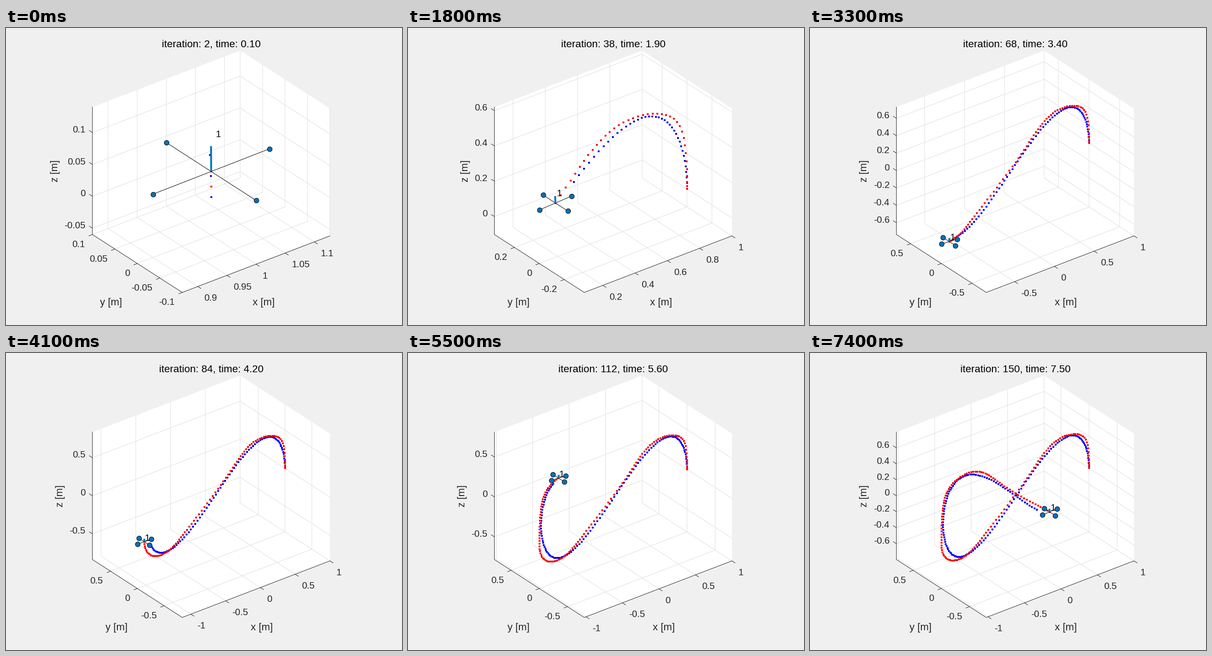
Write a matplotlib script that moves like this. It is 864 px wide and 648 px high and loops after 7500 ms.

```python
import numpy as np
import matplotlib.pyplot as plt
from matplotlib.animation import FuncAnimation

W, H, FRAMES, INTERVAL = 864, 648, 75, 100
DT, OMEGA = 0.05, 2 / 3
ARM, THRUST, LABEL_GAP = 0.1, 0.04, 0.1 / 3
ASPECT = 1.268                       # x side of the box relative to y and z
INK, BLUE, GREY = "#262626", "#0072BD", "#DFDFDF"
FONT, TICK_SIZE, LABEL_SIZE, TITLE_SIZE = "Liberation Sans", 20.4, 22.2, 22.4
MAX_TICKS = (6, 6, 7)

# screen directions of the box edges
FRONT = np.array([384.0, 576.5])
EDGES = np.array([[322.3, -123.4], [-196.0, -126.4], [0.0, -278.0]])


def bump(t, mid, width):
    return np.exp(-((t - mid) / width) ** 2)


def sway(a):
    """Steady sideways tracking error, mirrored every half turn."""
    return (0.024 * np.cos(a) - 0.156 * np.sin(a)
            + 0.006 * np.cos(5 * a) - 0.021 * np.cos(7 * a + 0.4))


def lift(a):
    """Steady height error, repeated every half turn."""
    return (0.1 * np.cos(2 * a) + 0.013 * np.sin(2 * a)
            + 0.006 * np.sin(4 * a) + 0.009 * np.cos(6 * a) - 0.002)


def points(x, z):
    return np.column_stack([x, np.zeros_like(x), z])


TIME = np.arange(2 * FRAMES + 1) * DT
THETA = OMEGA * TIME
PLAN = points(np.cos(THETA), 0.5 * np.sin(2 * THETA))

# the drone starts at rest, so both errors need a moment to settle
ERR_X = sway(THETA) + 0.02 * bump(TIME, 0.5, 0.3)
ERR_Z = lift(THETA) - (lift(0) + 0.43 * TIME) * bump(TIME, 0, 0.31)
FLOWN = points(np.clip(PLAN[:, 0] + ERR_X, -1.024, 1), PLAN[:, 2] + ERR_Z)
TILT = 0.045 * np.cos(THETA) - 0.04 * np.cos(3 * THETA)


def fit_limits(data):
    """Tight limits, widened around their middle to keep equal scales."""
    lo, hi = data.min(axis=0), data.max(axis=0)
    shape = np.array([ASPECT, 1, 1])
    half = shape * np.max((hi - lo) / shape) / 2
    mid = (lo + hi) / 2
    return mid - half, mid + half


def nice_ticks(lo, hi, most):
    for step in (0.01, 0.02, 0.05, 0.1, 0.2, 0.5, 1):
        first = np.ceil(lo / step - 1e-6)
        last = np.floor(hi / step + 1e-6)
        if last - first < most:
            return np.arange(first, last + 1) * step
    return np.array([])


def tick_text(v):
    return f"{round(v, 4) + 0:g}"


def text_width(s):
    return TICK_SIZE * sum({".": 0.278, "-": 0.333}.get(c, 0.556) for c in s)


fig = plt.figure(figsize=(W / 72, H / 72), dpi=72, facecolor="#F0F0F0")
ax = fig.add_axes([0, 0, 1, 1])


def line(pts, color, width=1, **kw):
    pts = np.asarray(pts)
    ax.plot(pts[:, 0], pts[:, 1], color=color, lw=width, **kw)


def dots(pts, color, z):
    ax.plot(pts[:, 0], pts[:, 1], ls="none", marker="s", ms=4, mew=0,
            color=color, zorder=z)


def write(x, y, s, size=TICK_SIZE, color=INK, ha="center", z=3):
    """Place text with its digits centred on y."""
    ax.text(x, y + 0.358 * size, s, fontname=FONT, fontsize=size, color=color,
            ha=ha, va="baseline", zorder=z)


def box(u, v, w):
    return FRONT + np.array([u, v, w]) @ EDGES


def draw_axes(lo, hi):
    hull = [box(0, 0, 0), box(1, 0, 0), box(1, 0, 1), box(1, 1, 1),
            box(0, 1, 1), box(0, 1, 0)]
    ax.fill(*np.array(hull).T, color="white", lw=0, zorder=0)

    ticks = [nice_ticks(lo[i], hi[i], MAX_TICKS[i]) for i in range(3)]
    frac = [(ticks[i] - lo[i]) / (hi[i] - lo[i]) for i in range(3)]
    grid = ([[(u, 0, 0), (u, 1, 0), (u, 1, 1)] for u in frac[0]]
            + [[(0, v, 0), (1, v, 0), (1, v, 1)] for v in frac[1]]
            + [[(0, 1, w), (1, 1, w), (1, 0, w)] for w in frac[2]])
    for path in grid:
        line([box(*p) for p in path], GREY, zorder=1)

    line([box(1, 0, 0), box(0, 0, 0), box(0, 1, 0), box(0, 1, 1)], INK, zorder=2)

    # tick start, tick mark, label offset, label alignment
    styles = [
        (lambda f: box(f, 0, 0), (6.8, 4.4), (14, 24), "left"),
        (lambda f: box(0, f, 0), (-7.6, 2.9), (-16, 20), "right"),
        (lambda f: box(0, 1, f), (-6.8, -4.4), (-15, -7.5), "right"),
    ]
    widest = []
    for (place, mark, gap, ha), vals, fr in zip(styles, ticks, frac):
        names = [tick_text(v) for v in vals]
        widest.append(max(map(text_width, names)))
        for name, f in zip(names, fr):
            p = place(f)
            line([p, p + mark], INK, zorder=2)
            write(*(p + gap), name, ha=ha)

    write(525.5 + 0.92 * widest[0], 597, "x [m]", LABEL_SIZE)
    write(278.5 - 1.07 * widest[1], 597, "y [m]", LABEL_SIZE)
    ax.text(152 - 0.96 * widest[2], 311, "z [m]", fontname=FONT, rotation=90,
            fontsize=LABEL_SIZE, color=INK, ha="center", va="center")


def update(k):
    ax.clear()
    ax.set_xlim(-0.5, W - 0.5)
    ax.set_ylim(H - 0.5, -0.5)
    ax.axis("off")

    n = 2 * (k + 1)
    plan, flown = PLAN[:n + 1], FLOWN[:n + 1]
    pos, tilt = flown[-1], TILT[n]
    fore = np.array([np.cos(tilt), 0, np.sin(tilt)]) * ARM
    side = np.array([0, ARM, 0])
    up = np.array([-np.sin(tilt), 0, np.cos(tilt)]) * THRUST
    motors = np.array([pos - fore, pos + fore, pos - side, pos + side])
    top = pos + up

    lo, hi = fit_limits(np.vstack([plan, flown, motors, [top]]))

    def project(p):
        return FRONT + (np.asarray(p) - lo) / (hi - lo) @ EDGES

    draw_axes(lo, hi)
    dots(project(plan), "blue", 6 if k == 0 else 4)
    dots(project(flown), "red", 5)

    ends = project(motors)
    line(ends[:2], "black", zorder=7)
    line(ends[2:], "black", zorder=7)
    ax.plot(ends[:, 0], ends[:, 1], ls="none", marker="o", ms=10.5, mew=1,
            mfc=BLUE, mec="black", zorder=8)
    line(project([pos, top]), BLUE, 4, solid_capstyle="butt", zorder=9)
    x, y = project(pos + LABEL_GAP)
    write(x, y + 1, "1", color="black", ha="left", z=10)

    write(447.5, 33.2, f"iteration: {n}, time: {n * DT:.2f}", TITLE_SIZE, "black")
    return []


anim = FuncAnimation(fig, update, frames=FRAMES, interval=INTERVAL,
                     init_func=lambda: [], repeat=True, repeat_delay=0)
plt.show()
```
